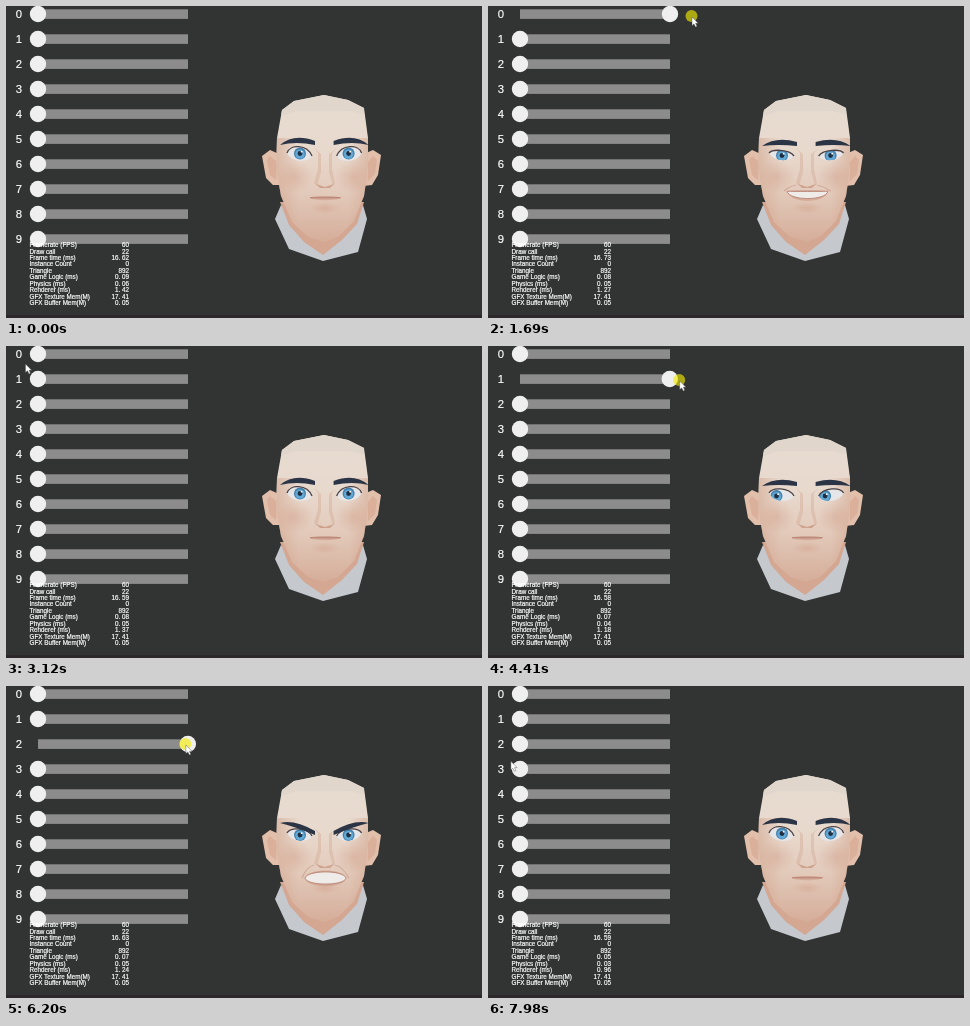
Write an HTML page that moves like this. It is 476 px wide and 312 px high and loops after 8000 ms.

```html
<!DOCTYPE html>
<html lang="en">
<head>
<meta charset="utf-8">
<title>Face sliders</title>
<style>
  html, body { margin: 0; width: 100%; height: 100%; overflow: hidden; background: #313433; }
  svg { display: block; width: 100vw; height: 100vh; }
  text { fill: #fff; stroke: #fff; stroke-width: .2; font-family: "Liberation Sans", Arial, sans-serif; }
  .label { font-size: 11.3px; text-anchor: middle; }
  .stats { font-size: 6.3px; }
  .value { text-anchor: end; }
</style>
</head>
<body>
<svg viewBox="0 0 476 312">
  <defs>
    <linearGradient id="skin" gradientUnits="userSpaceOnUse" x1="0" y1="90" x2="0" y2="248">
      <stop offset="0" stop-color="#e6dbd1"/>
      <stop offset=".35" stop-color="#e8d9cd"/>
      <stop offset=".6" stop-color="#e3cbbc"/>
      <stop offset="1" stop-color="#d2a691"/>
    </linearGradient>
    <linearGradient id="side" gradientUnits="userSpaceOnUse" x1="270" y1="0" x2="363" y2="0">
      <stop offset="0" stop-color="#cf9c83" stop-opacity=".5"/>
      <stop offset=".25" stop-color="#cf9c83" stop-opacity="0"/>
      <stop offset=".78" stop-color="#cf9c83" stop-opacity="0"/>
      <stop offset="1" stop-color="#cf9c83" stop-opacity=".5"/>
    </linearGradient>
    <radialGradient id="blush">
      <stop offset="0" stop-color="#d09a84" stop-opacity=".4"/>
      <stop offset="1" stop-color="#d09a84" stop-opacity="0"/>
    </radialGradient>
    <clipPath id="eyeClip0"><path/></clipPath>
    <clipPath id="eyeClip1"><path/></clipPath>
  </defs>

  <rect width="476" height="312" fill="#313433"/>
  <rect y="309" width="476" height="3" fill="#2b272a"/>

  <path fill="#c5c9ce" d="M275 199 269 213 283 243 317 255 352 246 361 213 357 199 317 240Z"/>
  <path fill="#d4a792" d="M274 196 283 219 298 236 317 249 336 234 351 218 358 196Z"/>
  <path fill="#e2bfab" d="M273 148 264 144 256 150 260 172 267 179 276 179ZM360 147 367 144 375 149 372 169 366 179 357 180Z"/>
  <path fill="#cc9a82" opacity=".4" d="M264 150 261 154 264 169 270 174 271 156ZM367 150 371 154 369 168 362 175 362 156Z"/>
  <g id="head">
    <path fill="url(#skin)" d="M318 89 342 94 358 102 362 132 362 162 358 190 348 215 332 231 318 236 302 231 286 216 275 190 270 162 271 132 276 104 288 95Z"/>
    <path fill="url(#side)" d="M362 132 362 162 358 190 348 215 332 231 318 236 302 231 286 216 275 190 270 162 271 132Z"/>
    <path fill="#e0d6cb" d="M318 89 342 94 358 102V108L343 105H290L275 110 276 104 288 95Z"/>
  </g>
  <ellipse cx="289" cy="171" rx="18" ry="17" fill="url(#blush)"/>
  <ellipse cx="347" cy="171" rx="18" ry="17" fill="url(#blush)"/>
  <ellipse cx="319" cy="202" rx="15" ry="6" fill="url(#blush)"/>
  <path fill="#d3a890" opacity=".4" d="M308 142 312 147 312 163 308 177 311 180 315 166V148ZM331 142 326 147 326 163 329 177 327 180 323 166V148Z"/>
  <path fill="#c89781" opacity=".8" d="M310 178 319 181 328 178 324 182H314Z"/>

  <path id="lips" fill="#cf9f8e" opacity=".7"/>
  <path id="mouth" fill="#eeebe8" stroke="#b98474" stroke-width=".9"/>
  <path id="creases" fill="none" stroke="#c99782" stroke-width="1.2"/>
  <g id="eyes"></g>
  <g id="sliders"></g>
  <g id="stats"></g>
  <g id="pointer">
    <circle id="press" r="6" cx="-.5" cy="-1" fill="#f4ec00" opacity=".64"/>
    <path fill="#fff" stroke="#444" stroke-width=".4" d="M0 0V8.6L2 6.9 3.5 10 5 9.3 3.6 6.3H6.2Z"/>
  </g>
</svg>
<script>
const LOOP = 8000, LEFT = 32, RIGHT = 182, ROW = 25, FACE_AXIS = 318.3;
const $ = id => document.getElementById(id);
const clamp = v => Math.min(1, Math.max(0, v));
const mix = (a, b, p) => a + (b - a) * p;
const random = n => { const v = Math.sin(n * 12.9898) * 43758.5453; return v - Math.floor(v); };

function ease(t, from, to) {
  const p = clamp((t - from) / (to - from));
  return p * p * (3 - 2 * p);
}

function add(parent, tag, attrs, text) {
  const el = document.createElementNS("http://www.w3.org/2000/svg", tag);
  for (const key in attrs) el.setAttribute(key, attrs[key]);
  if (text !== undefined) el.textContent = text;
  return parent.appendChild(el);
}

// One drag per slider: out to the right, hold, and back.
const drags = [
  { out: 950, full: 1680, back: 2080, home: 2860 },
  { out: 3530, full: 4190, back: 4390, home: 5235 },
  { out: 5930, full: 6205, back: 6620, home: 7600 }
];
const valueOf = (d, t) => ease(t, d.out, d.full) - ease(t, d.back, d.home);

const knobs = [];
for (let i = 0; i < 10; i++) {
  const y = 8 + ROW * i, sliders = $("sliders");
  add(sliders, "text", { x: 13, y: y + 4, class: "label" }, i);
  add(sliders, "rect", { x: LEFT, y: y - 4.7, width: RIGHT - LEFT, height: 9.6, fill: "#8c8c8c" });
  knobs.push(add(sliders, "circle", { cx: LEFT, cy: y, r: 8.2, fill: "#efefef" }));
}

const pointerRow = i => 11 + 24 * i;

function drawPointer(t) {
  const i = Math.max(0, drags.findLastIndex(d => t >= d.out)), d = drags[i];
  const reach = 204 - 12 * i, rest = 16 - 2 * i;
  const next = ease(t, d.home + 100, d.home + 550);
  let x = mix(28, reach, ease(t, d.out, d.full));
  x = mix(x, rest, ease(t, d.back, d.home));
  x = mix(x, 28, next);
  const y = mix(pointerRow(i), pointerRow(i + 1), next);
  const pressed = drags.some(d => t >= d.out - 110 && t < d.home + 50);
  $("pointer").setAttribute("transform", `translate(${x} ${y})`);
  $("pointer").setAttribute("visibility", t < drags[0].out - 250 ? "hidden" : "inherit");
  $("press").setAttribute("opacity", pressed ? .64 : 0);
}

const statNames = ["Framerate (FPS)", "Draw call", "Frame time (ms)", "Instance Count", "Triangle",
  "Game Logic (ms)", "Physics (ms)", "Renderer (ms)", "GFX Texture Mem(M)", "GFX Buffer Mem(M)"];
const statValues = statNames.map((name, i) => {
  const y = 241.2 + 6.42 * i;
  add($("stats"), "text", { x: 23.5, y, class: "stats" }, name);
  return add($("stats"), "text", { x: 123, y, class: "stats value" });
});

function drawStats(t) {
  const step = Math.floor(t / 300), load = random(step + 1);
  const frame = 16.56 + .2 * random(step + 50);
  const decimals = [frame, .05 + .04 * load, .03 + .03 * load, .96 + .5 * load].map(v => v.toFixed(2));
  const [frameTime, logic, physics, render] = decimals;
  [60, 22, frameTime, 0, 892, logic, physics, render, 17.41, .05].forEach((v, i) => {
    statValues[i].textContent = String(v).replace(".", ". ");
  });
}

const eyes = [0, 1].map(side => {
  const g = add($("eyes"), "g", {}), inner = add(g, "g", { "clip-path": `url(#eyeClip${side})` });
  add(inner, "rect", { x: 270, y: 130, width: 100, height: 40, fill: "#e6e6e8" });
  const iris = add(inner, "g", {});
  add(iris, "circle", { r: 6, fill: "#4580ab" });
  add(iris, "circle", { r: 4.7, cy: .6, fill: "#62a9d6" });
  add(iris, "circle", { r: 2.4, fill: "#1f2e40" });
  add(iris, "circle", { r: .9, cx: 1.6, cy: -1.8, fill: "#fff" });
  return {
    iris, flip: x => side ? 2 * FACE_AXIS - x : x,
    clip: $("eyeClip" + side).firstElementChild,
    upper: add(g, "path", { fill: "none", stroke: "#4a4044", "stroke-width": 1.3 }),
    brow: add(g, "path", { fill: "#2c3545" })
  };
});

function drawEyes(smile, glance, anger) {
  const outer = 139 + smile + glance - 2 * anger;
  const arch = 127 + 3 * smile + 3 * glance + 6 * anger;
  const inner = 135 + smile + glance + 10 * anger;
  const top = 138 + 5 * smile + 3 * glance + 3 * anger, bottom = 157 - smile;
  const lookX = -5.5 * glance, lookY = 147.5 + 2 * smile + 2.5 * glance + 1.5 * anger;
  for (const { flip: f, iris, clip, upper, brow } of eyes) {
    const lid = `M${f(281)} 147C${f(284)} ${top} ${f(301)} ${top} ${f(306)} 150`;
    clip.setAttribute("d", `${lid}C${f(302)} ${bottom} ${f(286)} ${bottom} ${f(281)} 147Z`);
    upper.setAttribute("d", lid);
    iris.setAttribute("transform", `translate(${f(294) + lookX} ${lookY})`);
    brow.setAttribute("d", `M${f(274)} ${outer}Q${f(288)} ${arch} ${f(309)} ${inner}` +
      `L${f(309)} ${inner + 4}Q${f(290)} ${arch + 8} ${f(274)} ${outer}Z`);
  }
}

function drawMouth(smile, anger) {
  const wide = smile + anger;
  const l = 304 - 5 * wide, r = 334.5 + 5.5 * wide, y = 191.7 - 6.5 * smile + .5 * anger;
  const up = 191.3 - 5.8 * smile - 7.5 * anger, low = 192 + 3 * smile + 8 * anger;
  const shape = (u, d) =>
    `M${l} ${y}C${l + 2} ${u} ${r - 2} ${u} ${r} ${y}C${r - 2} ${d} ${l + 2} ${d} ${l} ${y}Z`;
  $("mouth").setAttribute("d", shape(up, low));
  $("lips").setAttribute("d", shape(up - 2, low + 3));
  $("creases").setAttribute("d", `M308 179Q300 181 ${l - 3} ${y}M329 179Q337 181 ${r + 3} ${y}`);
  $("creases").setAttribute("opacity", .6 * wide);
}

function draw(now) {
  const t = now % LOOP;
  const [smile, glance, anger] = drags.map((d, i) => {
    const value = valueOf(d, t);
    knobs[i].setAttribute("cx", mix(LEFT, RIGHT, value));
    return value;
  });
  drawEyes(smile, glance, anger);
  drawMouth(smile, anger);
  drawPointer(t);
  drawStats(t);
}

let start;
function tick(now) {
  start ??= now;
  draw(now - start);
  requestAnimationFrame(tick);
}
draw(0);
requestAnimationFrame(tick);
</script>
</body>
</html>
```
